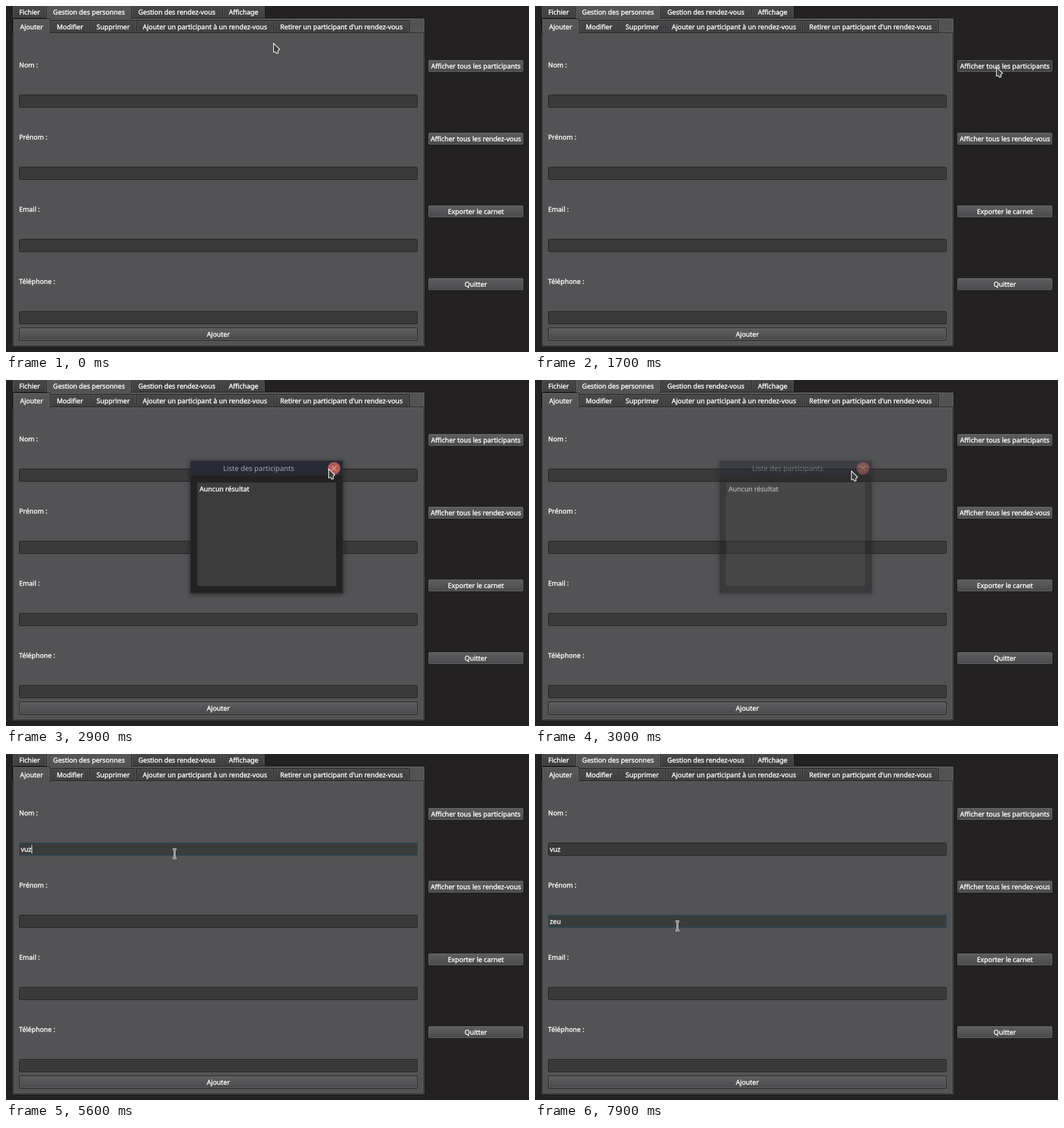
An HTML page for the animation above (8 s loop, 920 px wide and 609 px high).

```html
<!DOCTYPE html>
<html lang="fr">
<head>
<meta charset="utf-8">
<title>Carnet de rendez-vous</title>
<style>
  html, body { margin: 0; width: 100%; height: 100%; overflow: hidden; background: #232122; }
  svg { display: block; width: 920px; height: 609px; }
  text {
    font: 11.75px "Noto Sans", sans-serif; fill: #fff; stroke: #fff; stroke-width: .4;
    text-rendering: geometricPrecision; white-space: pre;
  }
  .title { font-size: 12.6px; fill: #a6a8ad; stroke: none; }
  #dialog { filter: drop-shadow(0 1px 4px rgba(0, 0, 0, .5)); }
</style>
</head>
<body>
<svg viewBox="0 0 920 609">
  <defs>
    <linearGradient id="raised" x2="0" y2="1"><stop stop-color="#5e5e60"/><stop offset="1" stop-color="#4a4a4c"/></linearGradient>
    <linearGradient id="active" x2="0" y2="1"><stop stop-color="#565658"/><stop offset="1" stop-color="#535355"/></linearGradient>
    <linearGradient id="idle" x2="0" y2="1"><stop stop-color="#48484a"/><stop offset="1" stop-color="#3f3f41"/></linearGradient>
  </defs>
  <g id="window"></g>
  <g id="dialog">
    <rect x="324" y="142" width="269" height="233.500" fill="#232122"/>
    <rect x="324" y="142" width="269" height="26" fill="#272a34"/>
    <rect x="324.500" y="142.500" width="268" height="232.500" fill="none" stroke="#30323b"/>
    <text class="title" x="444.500" y="160" text-anchor="middle">Liste des participants</text>
    <circle id="closeDisc" cx="577" cy="155.500" r="11" fill="#b25a52"/>
    <path id="closeCross" d="M572.500 151l9 9m0-9l-9 9" stroke="#d3d5d8" stroke-width="1.100"/>
    <rect x="336.500" y="180.500" width="244" height="182" fill="#3c3c3c" stroke="#303030"/>
    <text x="340.500" y="196">Auncun résultat</text>
  </g>
  <path id="arrow" d="M.6.6V16.500L4.500 15.500 6 18.800 9 17.600 8.200 14 11.400 11.300Z" fill="#3e3e3e" stroke="#fff" stroke-width="1.200" stroke-linejoin="round"/>
  <g id="beam" fill="none">
    <path d="M-3.500-8H3.500M0-8V8M-3.500 8H3.500" stroke="#fff" stroke-width="3"/>
    <path d="M-3.500-8H3.500M0-8V8M-3.500 8H3.500" stroke="#333" stroke-width="1"/>
  </g>
</svg>
<script>
const LOOP = 8000, STEP = 100;
const PANEL = '#535355', DARK = '#191818', LIGHT = '#69696b';
const $ = id => document.getElementById(id);
const win = $('window');

function add(tag, attrs, content = '') {
  const el = document.createElementNS('http://www.w3.org/2000/svg', tag);
  for (const key in attrs) el.setAttribute(key, attrs[key]);
  el.textContent = content;
  return win.appendChild(el);
}
const box = (x, y, w, h, fill, stroke, rx = 0) =>
  add('rect', { x: x + .5, y: y + .5, width: w - 1, height: h - 1, fill, stroke, rx });
const label = (x, y, content, anchor = 'start') =>
  add('text', { x, y, 'text-anchor': anchor }, content);

// Dark outline with a light line just inside it
function bevel(x, y, w, h, fill, rx = 0) {
  box(x, y, w, h, DARK, DARK, rx);
  return box(x + 1, y + 1, w - 2, h - 2, fill, LIGHT, rx / 2);
}

function tab(left, right, top, bottom, name, selected) {
  box(left, top, right - left, bottom - top + 1, selected ? 'url(#active)' : 'url(#idle)', DARK, 1);
  add('path', {
    d: `M${left + 1.5} ${bottom}V${top + 1.5}H${right - 1.5}V${bottom}`,
    fill: 'none', stroke: selected ? LIGHT : '#5a5a5c'
  });
  if (selected) add('rect', { x: left + 2, y: bottom - 1, width: right - left - 4, height: 4, fill: PANEL });
  label((left + right) / 2, (top + bottom) / 2 + (selected ? 5.5 : 5), name, 'middle');
}

function button(x, y, w, name) {
  const face = bevel(x, y, w, 23, 'url(#raised)', 2);
  label(x + w / 2, y + 16, name, 'middle');
  return face;
}

function field(y, name) {
  label(23, y - 48, name);
  const frame = box(23, y, 701, 23, '#3a3a3a', '#1e1e1f', 2);
  const value = label(26, y + 16, '');
  const caret = add('rect', { x: 26, y: y + 4, width: 1, height: 15, fill: '#fff', visibility: 'hidden' });
  return { frame, value, caret };
}

// Main tabs and panel
bevel(11, 21, 726, 579, PANEL);
tab(11, 72, -2, 21, 'Fichier');
tab(220, 381, -2, 21, 'Gestion des rendez-vous');
tab(380, 456, -2, 21, 'Affichage');
tab(71, 221, -4, 22, 'Gestion des personnes', true);

// Inner tabs and page
bevel(13, 47, 722, 551, PANEL);
tab(77, 148, 25, 47, 'Modifier');
tab(147, 230, 25, 47, 'Supprimer');
tab(229, 471, 25, 47, 'Ajouter un participant à un rendez-vous');
tab(470, 710, 25, 47, "Retirer un participant d'un rendez-vous");
tab(12, 78, 22, 48, 'Ajouter', true);

const [lastName, firstName] =
  ['Nom :', 'Prénom :', 'Email :', 'Téléphone :'].map((name, i) => field(156 + 127 * i, name));
button(23, 566, 701, 'Ajouter');
const [showPeople] =
  ['Afficher tous les participants', 'Afficher tous les rendez-vous', 'Exporter le carnet', 'Quitter']
    .map((name, i) => button(742, 94 + 128 * i, 169, name));

// Pointer keys: time, x, y
const pointer = [
  [0, 470, 65], [600, 470, 65], [700, 757, 1], [800, 790, -30], [1000, 905, -30],
  [1100, 908, 2], [1200, 850, 45], [1300, 757, 85], [1400, 790, 104], [1500, 811, 107],
  [2000, 811, 107], [2200, 720, 128], [2400, 590, 153], [2500, 565, 155], [2700, 565, 155],
  [2900, 567, 156], [3100, 545, 163], [3500, 302, 177], [4000, 302.5, 176.5],
  [4500, 302, 177], [4700, 296, 175.5], [4900, 296.5, 175.5], [6000, 296.5, 175.5],
  [6600, 249, 301], [7100, 249, 301], [7400, 250.5, 302.5], [LOOP, 250.5, 302.5]
];
function pointerAt(t) {
  const i = pointer.findIndex(key => key[0] > t);
  const [t0, x0, y0] = pointer[i - 1], [t1, x1, y1] = pointer[i];
  const k = (t - t0) / (t1 - t0);
  return [x0 + (x1 - x0) * k, y0 + (y1 - y0) * k];
}

const within = (t, from, to) => t >= from && t < to;
const typed = (t, word, times) => word.slice(0, times.filter(time => t >= time).length);
const show = (el, visible) => el.setAttribute('visibility', visible ? 'visible' : 'hidden');

function updateField({ frame, value, caret }, word, focused, caretOn) {
  frame.setAttribute('fill', focused ? '#3a3c3c' : '#3a3a3a');
  frame.setAttribute('stroke', focused ? '#174c65' : '#1e1e1f');
  value.textContent = word;
  caret.setAttribute('x', 26 + (word ? Math.round(value.getComputedTextLength()) : 0));
  show(caret, caretOn);
}

function render(t) {
  const [x, y] = pointerAt(t);
  const overField = t >= 3100 && (y < 179 || y >= 283);
  show($('arrow'), !overField);
  show($('beam'), overField);
  $(overField ? 'beam' : 'arrow').setAttribute('transform', `translate(${x} ${y})`);

  showPeople.setAttribute('fill', t === 1700 ? '#434345' : 'url(#raised)');

  const closeHover = t >= 2500;
  show($('dialog'), within(t, 1800, 3100));
  $('dialog').setAttribute('opacity', t >= 3000 ? .5 : 1);
  $('closeDisc').setAttribute('opacity', closeHover ? 1 : 0);
  $('closeCross').setAttribute('stroke', closeHover ? '#dfb0a8' : '#d3d5d8');

  updateField(lastName, typed(t, 'vuz', [5300, 5500, 5600]), within(t, 3500, 6500),
    within(t, 3500, 4000) || within(t, 4400, 4900) || within(t, 5300, 6100));
  updateField(firstName, typed(t, 'zeu', [7000, 7200, 7400]), t >= 6600, within(t, 6600, 7900));
}

function frame() {
  const now = performance.now() % LOOP;
  render(Math.floor(now / STEP) * STEP);
  requestAnimationFrame(frame);
}
frame();
</script>
</body>
</html>
```
